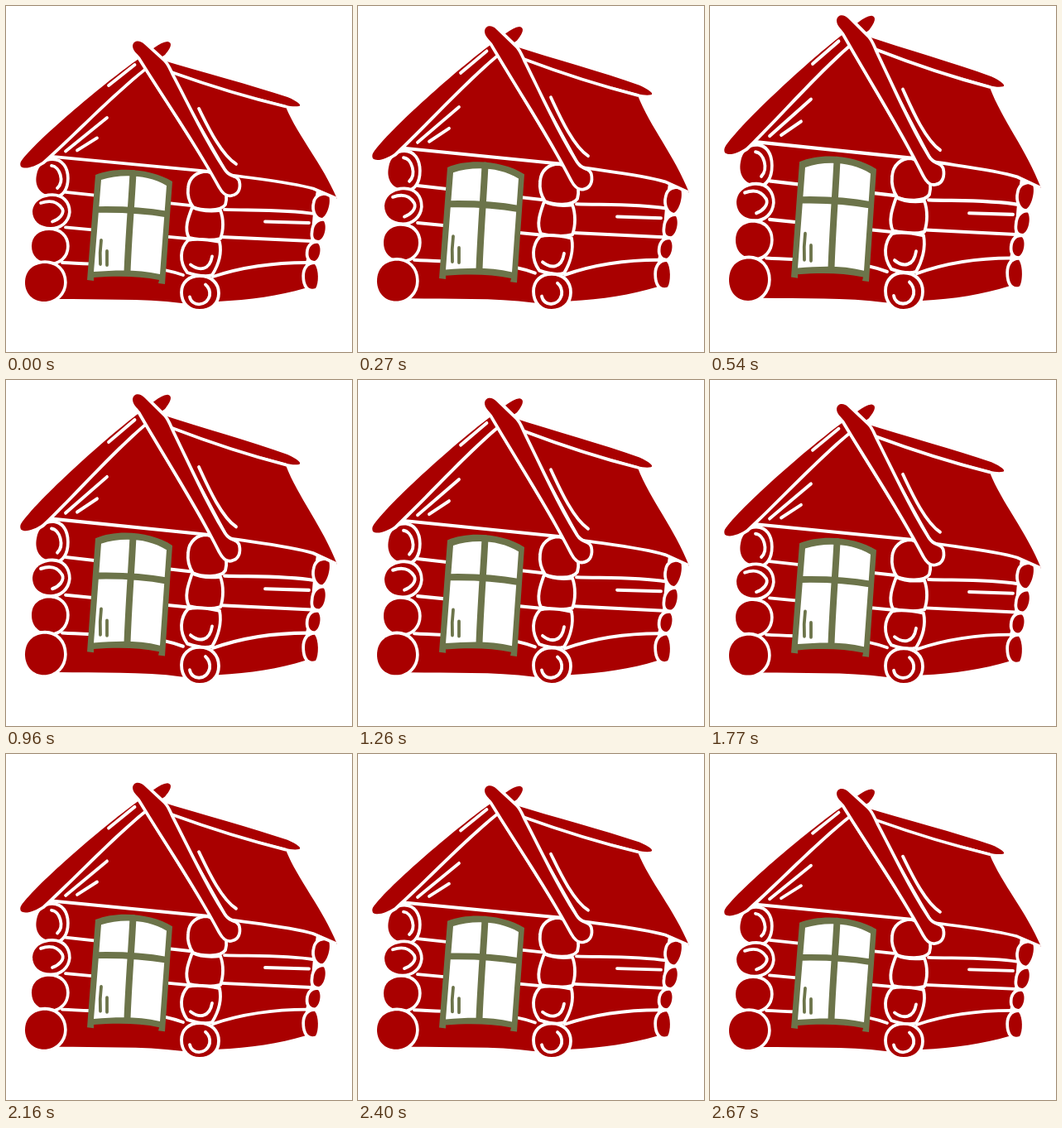
These frames come from a looping animation (418x418 px, 2700 ms). An HTML page with a canvas:

```html
<!DOCTYPE html>
<html lang="en">
<head>
<meta charset="utf-8">
<title>Log cabin</title>
<style>
html, body { margin: 0; width: 100%; height: 100%; overflow: hidden; background: #fff; }
canvas { display: block; }
</style>
</head>
<body>
<canvas id="stage" width="418" height="418"></canvas>
<script>
const ctx = document.getElementById('stage').getContext('2d');
const RED = '#a90000', OLIVE = '#6c744a', WHITE = '#fff';
const LOOP = 2700, PEAK = 480, STRETCH = 0.099, GROUND = 367;

ctx.lineCap = ctx.lineJoin = 'round';

function fill(path, color = RED) {
  ctx.fillStyle = color;
  ctx.fill(new Path2D(path));
}

function line(path, width = 3.8, color = WHITE) {
  ctx.strokeStyle = color;
  ctx.lineWidth = width;
  ctx.stroke(new Path2D(path));
}

// Red piece with a white rim around its outside
function piece(path) {
  line(path, 7.4);
  fill(path);
}

// Red piece with the white rim centred on its edge
function seamed(path) {
  fill(path);
  line(path);
}

function drawWalls() {
  fill('M56 182 L243 200 L236 360 L212 359 C165 353 110 355 62 354 Z');
  fill('M245 204 L279 205 C320 208 350 212 375 222 L371 250 L368 284 L362 310 L361 341 C330 350 295 355 256 357 L236 350 Z');
  line('M72 225 L222 241 M72 267.500 L218 281 M68 310 C120 313 175 311 214 325');
  line('M264 246 C300 247 340 246 372 251 M260 279 L369 284 M250 327 C280 317 320 310 364 310');
  line('M313 260.500 L366 262');
}

function drawLogEnds() {
  piece('M37 204 C39 192 47 187 56 187 C67 187 73 196 73 208 C73 221 67 230 56 229 C42 229 34 218 37 204 Z');
  piece('M32 248 C33 236 44 230 56 230 C68 230 75 238 75 249 C74 260 65 267 54 267 C40 267 32 259 32 248 Z');
  piece('M31 290 C31 278 40 271 52 271 C65 271 73 279 73 290 C73 302 64 310 52 310 C39 310 31 302 31 290 Z');
  piece('M23 334 C23 320 33 311 47 311 C60 311 70 320 70 334 C70 347 59 357 46 357 C32 357 23 347 23 334 Z');
  line('M55 193 C65 194 71 212 62 220 M42 238 C54 234 62 236 68 245 C71 251 64 258 56 260.500');

  piece('M373.500 238 C375 229 383 228 390 229 C393 238 388 253 382 256 C376 256 371 247 373.500 238 Z');
  piece('M371.500 273 C372 264 378 259 384 260 C388 266 385 281 378 283 C372 283 370.500 279 371.500 273 Z');
  piece('M365.500 298 C366 290 371 286 377 287 C382 292 379 306 373 308 C368 308 365 304 365.500 298 Z');
  piece('M361 326 C361 318 365 312 373 312 C378 318 378 335 374 341 C366 344 361 338 361 326 Z');
}

function drawCorner() {
  seamed('M220 220 C221 207 231 200 243 200 C258 203 270 224 265 240 C259 249 236 247 226 243 C221 236 219 228 220 220 Z');
  seamed('M225 243 C235 248 249 248 259 247 C263 257 263 271 259 281 C248 284 235 283 221 280 C215 269 220 256 225 243 Z');
  seamed('M220 283 C232 280 248 283 258 285 C261 299 256 314 249 325 C240 328 228 325 219 322 C209 309 210 293 220 283 Z');
  seamed('M212 346 C212 334 221 326 234 326 C248 326 257 335 257 347 C257 360 247 368 234 368 C221 368 212 359 212 346 Z');
  line('M223 312.500 C233 320 246 320 249 302.500 M222 351.500 C224 363 242 364 246 350 C247 343 244 339 241 336.500');
}

function drawRoof() {
  fill('M50 182 L168 78 L246 200 Z');
  line('M50 181.500 L245 200');
  fill('M196 76 L338 122 C353 158 382 190 400 233 L370 221 C345 213 305 209 270 204 Z');
  line('M270 204 C305 209 345 213 371 220.500 L398 232', 3.6);
  piece('M18 188 C36 162 125 88 160 64 C175 54 185 44 195 43 C202 44 199 51 192 59 L166 76 C129 105 79 157 44 188 C35 194 23 198 18 194 C17 192 17 190 18 188 Z');
  fill('M184 64 C240 81 295 95 340 110 C352 115 358 120 354 121 C349 122 343 121 338 120 C290 108 240 92 196 77 Z');
  line('M200 80 C245 96 290 110 338 121.500', 3.6);
  line('M124 96 L155.500 71 M72 175.500 L122 135 M86 174.500 L110 159.500');
  line('M233 124 C242 142 259 179 278 191');
}

function drawFrontBeam() {
  piece('M153 48 C154 41 162 41 167 46 L189 66 C194 70 197 78 201 86 C221 124 240 164 263 199 C270 209 278 206 280 212 C282 220 279 226 273 227 C267 229 263 225 259 218 C229 163 195 115 162 62 C158 57 153 54 153 48 Z');
}

function drawWindow() {
  fill('M108 204 C135 193 177 197 201 212 L192 336 L184 335 L185 331 C160 326 132 326 106 328 L106 332 L98 331 Z', OLIVE);
  fill('M115 210 C138 203 170 203 194 217 L186 324 C160 318 134 319 106 321 Z', WHITE);
  line('M153.500 202 C151.500 240 148 280 146.500 321', 8, OLIVE);
  line('M110 246 C138 245.500 168 247 194 251.500', 7.6, OLIVE);
  line('M115 283 Q113 298 114 312 M122 296 L122 313', 3.8, OLIVE);
}

function stretchAt(t) {
  const amount = t < PEAK ? t / PEAK : (LOOP - t) / (LOOP - PEAK);
  return 1 + STRETCH * amount;
}

function render(now) {
  const scale = stretchAt(now % LOOP);
  ctx.setTransform(1, 0, 0, 1, 0, 0);
  fill('M0 0 H418 V418 H0 Z', WHITE);
  ctx.setTransform(1, 0, 0, scale, 0, GROUND * (1 - scale));
  drawWalls();
  drawLogEnds();
  drawRoof();
  drawCorner();
  drawFrontBeam();
  drawWindow();
}

const start = performance.now();
function tick() {
  render(performance.now() - start);
  requestAnimationFrame(tick);
}
tick();
</script>
</body>
</html>
```
